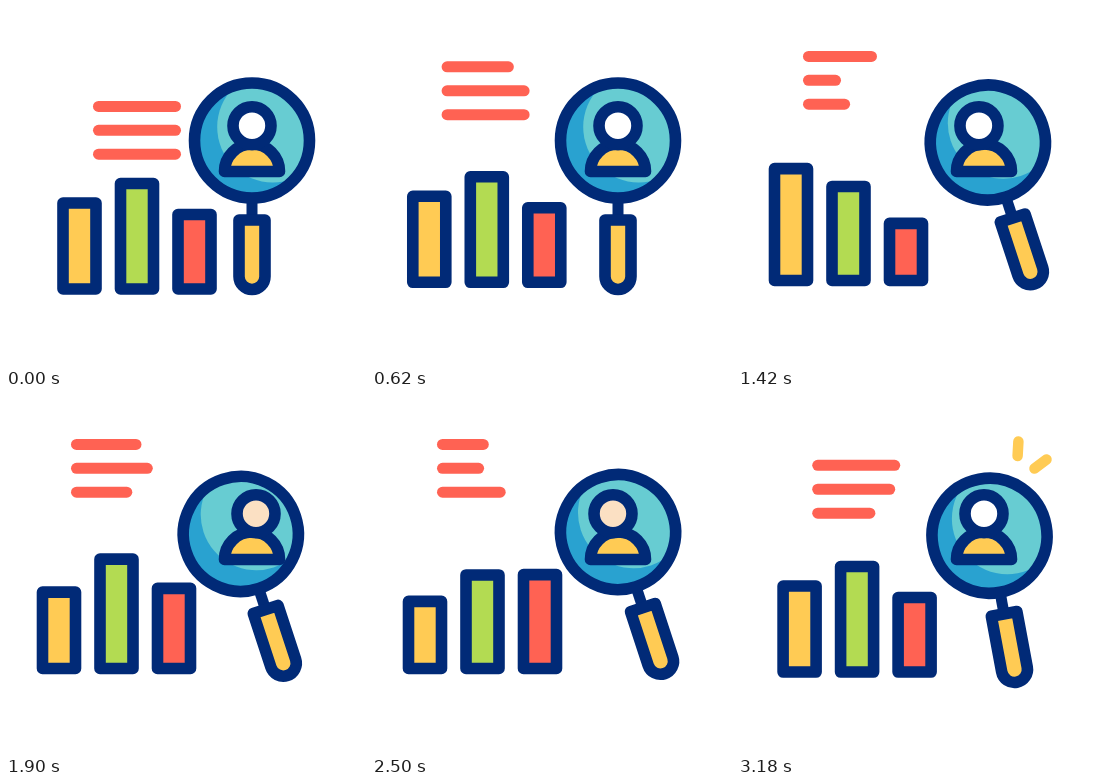
Animation, 360 px wide and 360 px high, one loop 3.2 s. Source, as an HTML page with a canvas:

```html
<!DOCTYPE html>
<html lang="en">
<head>
<meta charset="utf-8">
<title>Audience research</title>
<style>
html, body { margin: 0; width: 100%; height: 100%; overflow: hidden; background: #fff; }
canvas { display: block; width: 360px; height: 360px; }
</style>
</head>
<body>
<canvas id="stage"></canvas>
<script>
const LOOP = 3200, STEP = 20;
const NAVY = '#012a77', YELLOW = '#ffcb54', GREEN = '#b3db52', RED = '#ff6253';
const TEAL = '#67ccd2', BLUE = '#29a2d0', CREAM = '#fbe0c3', WHITE = '#ffffff';
const TAU = Math.PI * 2, INK = 11.6;

const canvas = document.getElementById('stage');
const ctx = canvas.getContext('2d');
const ratio = window.devicePixelRatio || 1;
canvas.width = canvas.height = Math.round(360 * ratio);

const clamp = (v, lo, hi) => Math.max(lo, Math.min(hi, v));
const ease = p => (1 - Math.cos(Math.PI * clamp(p, 0, 1))) / 2;
const ramp = (t, a, b) => ease((t - a) / (b - a));

// Eased travel through values reached at the given times
const track = (t, times, values) => values.slice(1).reduce(
  (sum, v, i) => sum + (v - values[i]) * ramp(t, times[i], times[i + 1]), values[0]);

const BAR_TIMES = [720, 1400, 1880, 2240, 3180];
const BARS = [
  { color: YELLOW, rest: 97, peaks: [123, 87.5, 74] },
  { color: GREEN, rest: 116.5, peaks: [105, 120.5, 102] },
  { color: RED, rest: 85.5, peaks: [68, 91, 109] }
];

const LINE_STARTS = [380, 780, 965], LINE_PERIOD = 1265;

const HOME = { x: 246, y: 134.5 };
const PATH = {
  times: [650, 1190, 1590, 1940, 2200, 2820],
  x: [HOME.x, 236, 258.5, 234, 237.5, 255.5],
  y: [HOME.y, 132.5, 139, 140, 130, 147]
};

function outline() {
  ctx.strokeStyle = NAVY;
  ctx.lineWidth = INK;
  ctx.stroke();
}

function disc(x, y, r, fill) {
  ctx.beginPath();
  ctx.arc(x, y, r, 0, TAU);
  ctx.fillStyle = fill;
  ctx.fill();
}

function stroke(x0, y0, x1, y1, color, width) {
  ctx.beginPath();
  ctx.moveTo(x0, y0);
  ctx.lineTo(x1, y1);
  ctx.strokeStyle = color;
  ctx.lineWidth = width;
  ctx.stroke();
}

function drawLines(t, shift) {
  ctx.lineCap = 'round';
  LINE_STARTS.forEach((start, i) => {
    const cycle = clamp((t - start) / LINE_PERIOD, 0, 2);
    const length = 52 + 25 * Math.cos(TAU * cycle);
    const x = 92.5 - 22 * shift, y = 100.4 + 23.9 * i - 50 * shift;
    stroke(x, y, x + length, y, RED, 11);
  });
}

function drawBars(t, shift) {
  BARS.forEach(({ color, rest, peaks }, i) => {
    const h = track(t, BAR_TIMES, [rest, ...peaks, rest]) - 11;
    ctx.beginPath();
    ctx.rect(57 + 57.5 * i - 20.5 * shift, 283 - 8.5 * shift - h, 33, h);
    ctx.fillStyle = color;
    ctx.fill();
    outline();
  });
}

function drawMagnifier(t, back) {
  const x = HOME.x + (track(t, PATH.times, PATH.x) - HOME.x) * back;
  const y = HOME.y + (track(t, PATH.times, PATH.y) - HOME.y) * back;
  const angle = 18.2 * ramp(t, 650, 1230) * back;
  ctx.save();
  ctx.translate(x, y);
  ctx.rotate(-angle * Math.PI / 180);

  ctx.lineCap = 'butt';
  stroke(0, 58, 0, 80, NAVY, 11);
  ctx.beginPath();
  ctx.moveTo(-13, 79.5);
  ctx.lineTo(13, 79.5);
  ctx.arc(0, 136, 13, 0, Math.PI);
  ctx.closePath();
  ctx.fillStyle = YELLOW;
  ctx.fill();
  outline();

  ctx.save();
  disc(0, 0, 57.5, BLUE);
  ctx.clip();
  disc(20.7, -13.5, 55.5, TEAL);
  ctx.restore();
  ctx.beginPath();
  ctx.arc(0, 0, 57.5, 0, TAU);
  outline();
  ctx.restore();
}

function drawPerson(t) {
  ctx.beginPath();
  ctx.arc(246, 165.5, 27.5, Math.PI, TAU);
  ctx.closePath();
  ctx.fillStyle = YELLOW;
  ctx.fill();
  outline();

  // The head turns left, right, left and back
  const turns = [0, -6, 4, -5, 0];
  const x = 246 + track(t, turns.map((_, i) => 700 + 600 * i), turns), y = 119.7;

  // White sweeps softly across the face from the left
  const white = 1 - ramp(t, 1480, 1860) + ramp(t, 2660, 2900);
  const edge = x - 24 + 48 * white;
  const face = ctx.createLinearGradient(edge - 5, 0, edge + 5, 0);
  face.addColorStop(0, WHITE);
  face.addColorStop(1, CREAM);
  disc(x, y, 19, face);
  outline();
}

function drawSparks(t) {
  const grow = ramp(t, 3020, 3170);
  if (grow <= 0) return;
  const width = 10.5 * Math.min(1, grow * 2);
  ctx.lineCap = 'round';
  stroke(279.6, 62, 279.6 + 0.8 * grow, 62 - 14.5 * grow, YELLOW, width);
  stroke(296.5, 74.5, 296.5 + 12 * grow, 74.5 - 9 * grow, YELLOW, width);
}

function draw(t) {
  const back = 1 - ramp(t, 2920, 3500);
  const shift = ramp(t, 205, 800) * back;
  ctx.setTransform(ratio, 0, 0, ratio, 0, 0);
  ctx.fillStyle = WHITE;
  ctx.fillRect(0, 0, 360, 360);
  ctx.lineJoin = 'round';
  drawLines(t, shift);
  drawBars(t, shift);
  drawMagnifier(t, back);
  drawPerson(t);
  drawSparks(t);
}

const start = performance.now();
function tick() {
  const t = (performance.now() - start) % LOOP;
  draw(t < 220 ? 0 : Math.floor(t / STEP) * STEP);
  requestAnimationFrame(tick);
}
tick();
</script>
</body>
</html>
```
